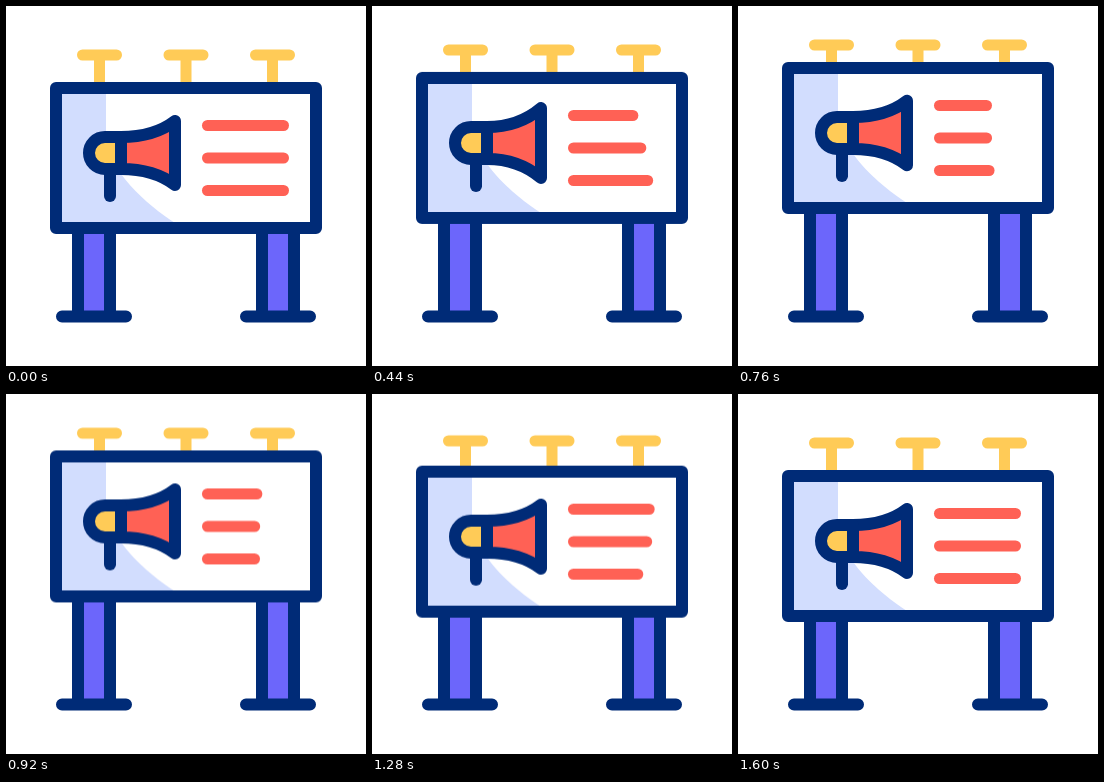
An HTML page without scripts that plays this animation: 360 by 360 pixels, repeating every 1640 ms.

```html
<!DOCTYPE html>
<html lang="en">
<head>
<meta charset="utf-8">
<title>Billboard</title>
<style>
  html, body { margin: 0; width: 100%; height: 100%; overflow: hidden; background: #fff; }
  svg { display: block; width: 100%; height: 100%; }

  .ink { fill: none; stroke: #002b77; stroke-width: 12; stroke-linecap: round; stroke-linejoin: round; }
  .lamp { fill: none; stroke: #ffcb57; stroke-width: 11; stroke-linecap: round; }
  .post { fill: #6c66fb; }
  .shade { fill: #d2ddfe; }
  .panel { fill: #fff; }
  .bulb { fill: #ffcb57; }
  .horn, .bars { fill: #ff6155; }

  .lamps, .board, .horn, .bars rect {
    animation: 1.64s cubic-bezier(.5, 0, .5, 1) infinite both;
  }
  .lamps { --rise: -10px; animation-name: rise; }
  .board { --rise: -20px; animation-name: rise; }
  .horn { animation-name: flare; }
  .bars rect { width: 87px; animation-name: shrink; }
  .bars rect:nth-child(2) { animation-delay: 80ms; }
  .bars rect:nth-child(3) { animation-delay: 190ms; }

  @keyframes rise {
    0%, 7.32%, 92.07%, 100% { transform: translateY(0); }
    46.34%, 51.22% { transform: translateY(var(--rise)); }
  }
  @keyframes shrink {
    0%, 8.54%, 80.85%, 100% { width: 87px; }
    42.68%, 49.15% { width: 58px; }
  }
  @keyframes flare {
    0%, 7.32%, 51.22%, 100% { d: path("M115 131C138 131 156 125 169 115V179C156 169 138 163 115 163Z"); }
    29.27% { d: path("M115 131C138 131 156 123 169 112V182C156 171 138 163 115 163Z"); }
  }
</style>
</head>
<body>
<svg viewBox="0 0 360 360">
  <defs>
    <path id="lamp" class="lamp" d="M-17 49H17M0 49V95"/>
    <g id="leg">
      <path class="post" d="M-16 200H16V310H-16Z"/>
      <path class="ink" d="M-16 206V310M16 206V310M-32 310.5H32"/>
    </g>
  </defs>

  <g class="lamps">
    <use href="#lamp" x="93.5"/>
    <use href="#lamp" x="180"/>
    <use href="#lamp" x="266.5"/>
  </g>

  <use href="#leg" x="88"/>
  <use href="#leg" x="272"/>

  <g class="board">
    <path class="panel" d="M50 82H310V222H50Z"/>
    <path class="shade" d="M50 82H100V130C102 165 140 198 169 217V222H50Z"/>
    <path class="ink" d="M50 82H310V222H50Z"/>

    <path class="ink" d="M104 163V190"/>
    <path class="ink horn" d="M115 131C138 131 156 125 169 115V179C156 169 138 163 115 163Z"/>
    <path class="ink bulb" d="M115 131H99A16 16 0 0 0 99 163H115Z"/>

    <g class="bars">
      <rect x="196" y="114" height="11" rx="5.5"/>
      <rect x="196" y="146.5" height="11" rx="5.5"/>
      <rect x="196" y="179" height="11" rx="5.5"/>
    </g>
  </g>
</svg>
</body>
</html>
```
